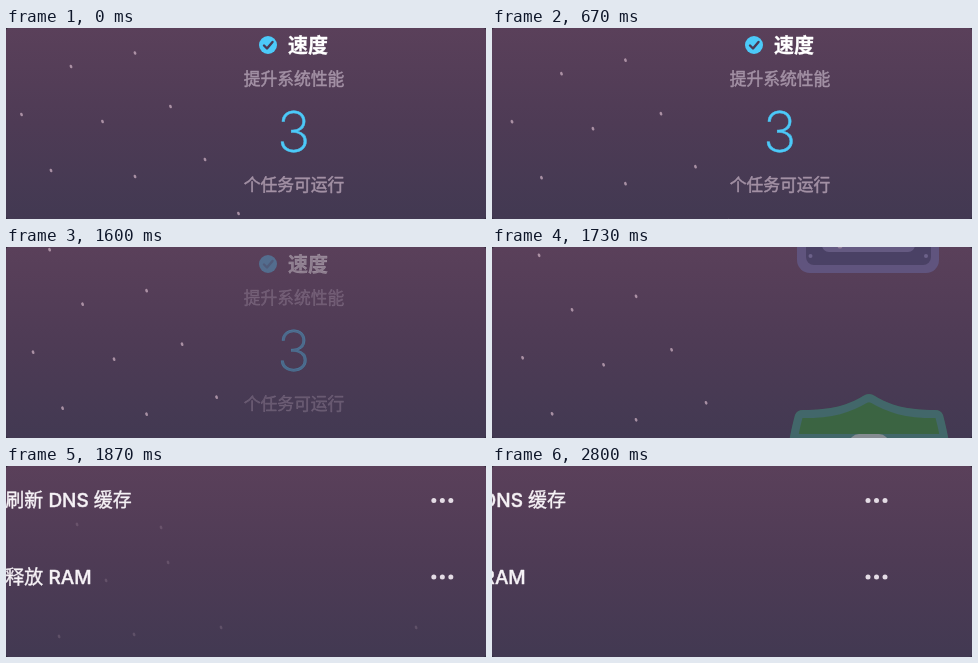
These frames come from a looping animation (480x191 px, 7270 ms). An HTML page with a canvas:

```html
<!DOCTYPE html>
<html lang="zh-CN">
<head>
<meta charset="utf-8">
<style>
  html, body { margin: 0; width: 100%; height: 100%; overflow: hidden; background: #2d2838; }
  canvas { display: block; width: 100%; height: 100%; }
</style>
</head>
<body>
<canvas id="stage" width="480" height="191"></canvas>
<script>
const ctx = document.getElementById('stage').getContext('2d');
const LOOP = 7270, STEP = 1000 / 15, LAST_STEP = 42;
const FONT = 'Inter, "Noto Sans CJK SC", "Noto Sans CJK", sans-serif';
const BLUE = '#4ccaf9', MUTED = '#a391a5';

const driftStars = [[65, 38.5], [129, 25], [15.5, 86.5], [96.5, 93.5], [164.5, 78.5],
  [199, 131.5], [45, 142.5], [129, 148.5], [232.5, 185.5], [32, -16]];
const listStars = [[41, 54], [98, 164], [132, 92], [125, 57], [23, 166],
  [70, 110], [185, 157], [380, 157]];

const clamp = v => Math.max(0, Math.min(1, v));
const ramp = (n, from, to) => clamp((n - from) / (to - from));

function layer(alpha, draw) {
  if (alpha <= 0) return;
  ctx.save();
  ctx.globalAlpha = alpha;
  draw();
  ctx.restore();
}

function disc(x, y, r, color) {
  ctx.fillStyle = color;
  ctx.beginPath();
  ctx.arc(x, y, r, 0, 2 * Math.PI);
  ctx.fill();
}

function panel(x, y, w, h, r, color) {
  ctx.fillStyle = color;
  ctx.beginPath();
  ctx.roundRect(x, y, w, h, r);
  ctx.fill();
}

// A thin outline gives the in-between weights the CJK font lacks.
function text(string, x, y, size, weight, color, { align = 'left', outline = 0 } = {}) {
  ctx.font = `${weight} ${size}px ${FONT}`;
  ctx.textAlign = align;
  ctx.fillStyle = ctx.strokeStyle = color;
  ctx.fillText(string, x, y);
  if (outline) {
    ctx.lineWidth = outline;
    ctx.lineJoin = 'round';
    ctx.strokeText(string, x, y);
  }
}

function background() {
  const shade = ctx.createLinearGradient(0, 0, 0, 191);
  shade.addColorStop(0, '#5a405a');
  shade.addColorStop(0.5, '#4e3b55');
  shade.addColorStop(1, '#423952');
  panel(0, 0, 480, 191, 3, shade);
}

function stars(list, dx, dy) {
  ctx.fillStyle = '#c9aebf';
  for (const [x, y] of list) {
    ctx.beginPath();
    ctx.ellipse(x + dx, y + dy, 1.3, 1.9, -0.4, 0, 2 * Math.PI);
    ctx.fill();
  }
}

function summary() {
  disc(262, 17, 9, BLUE);
  ctx.strokeStyle = '#4a3a55';
  ctx.lineWidth = 2.4;
  ctx.lineCap = ctx.lineJoin = 'round';
  ctx.stroke(new Path2D('M258 17.5 L261 20.5 L266.5 14'));
  const note = { align: 'center', outline: 0.5 };
  text('速度', 282, 24.5, 20, 700, '#fff', { outline: 0.3 });
  text('提升系统性能', 288, 57, 16.8, 400, MUTED, note);
  text('3', 287.5, 124, 56, 250, BLUE, note);
  text('个任务可运行', 288, 163, 16.8, 400, MUTED, note);
}

function icons() {
  panel(305, -40, 142, 66, 13, '#60547e');
  panel(314, -40, 125, 58, 8, '#4a4165');
  panel(330, -40, 93, 45, 7, '#655a82');
  disc(318.5, 9, 2, '#6c618a');
  disc(434, 9, 2, '#6c618a');
  disc(348, -1, 2.5, '#94809c');

  const shield = new Path2D('M297 195 Q300 179 303 168 Q305 163 311 163' +
    'C340 163 356 158 371 149 Q377 145 383 149' +
    'C398 158 414 163 443 163 Q449 163 451 168 Q454 179 457 195 Z');
  ctx.save();
  ctx.clip(shield);
  ctx.fillStyle = '#3b6442';
  ctx.fill(shield);
  ctx.strokeStyle = '#42676a';
  ctx.lineWidth = 16;
  ctx.stroke(shield);
  ctx.restore();
  panel(357, 187, 40, 20, 10, '#858b91');
}

function taskRow(label, baseline, offset) {
  text(label, offset - 52.5, baseline, 19, 500, '#f6f2f6', { outline: 0.4 });
  for (let i = 0; i < 3; i++) disc(376 + 8.5 * i + offset, baseline - 6.5, 2.5, '#e4dce5');
}

function render(time) {
  // The motion advances at 15 steps per second, then rests.
  const n = Math.min(LAST_STEP, Math.floor((time % LOOP + 4) / STEP));
  const drift = 0.72 * n + 0.35 * Math.max(0, n - 22) ** 2;
  const offset = 240 * (1 - ramp(n, 26, 31)) ** 3;

  ctx.clearRect(0, 0, 480, 191);
  background();
  layer(0.75 * (1 - ramp(n, 26, 28)), () => stars(driftStars, 0.62 * drift, drift));
  layer(0.2 * ramp(n, 26, 28) * (1 - ramp(n, 30, LAST_STEP)),
    () => stars(listStars, 0.58 * offset, 0.085 * offset));
  layer(1 - ramp(n, 22, 25), summary);
  layer(ramp(n, 24, 26) * (1 - ramp(n, 26, 28)), icons);
  layer(ramp(n, 26, 28), () => {
    taskRow('刷新 DNS 缓存', 41, offset);
    taskRow('释放 RAM', 117.5, offset);
  });
}

const start = performance.now();
function tick() {
  render(performance.now() - start);
  requestAnimationFrame(tick);
}
tick();
</script>
</body>
</html>
```
